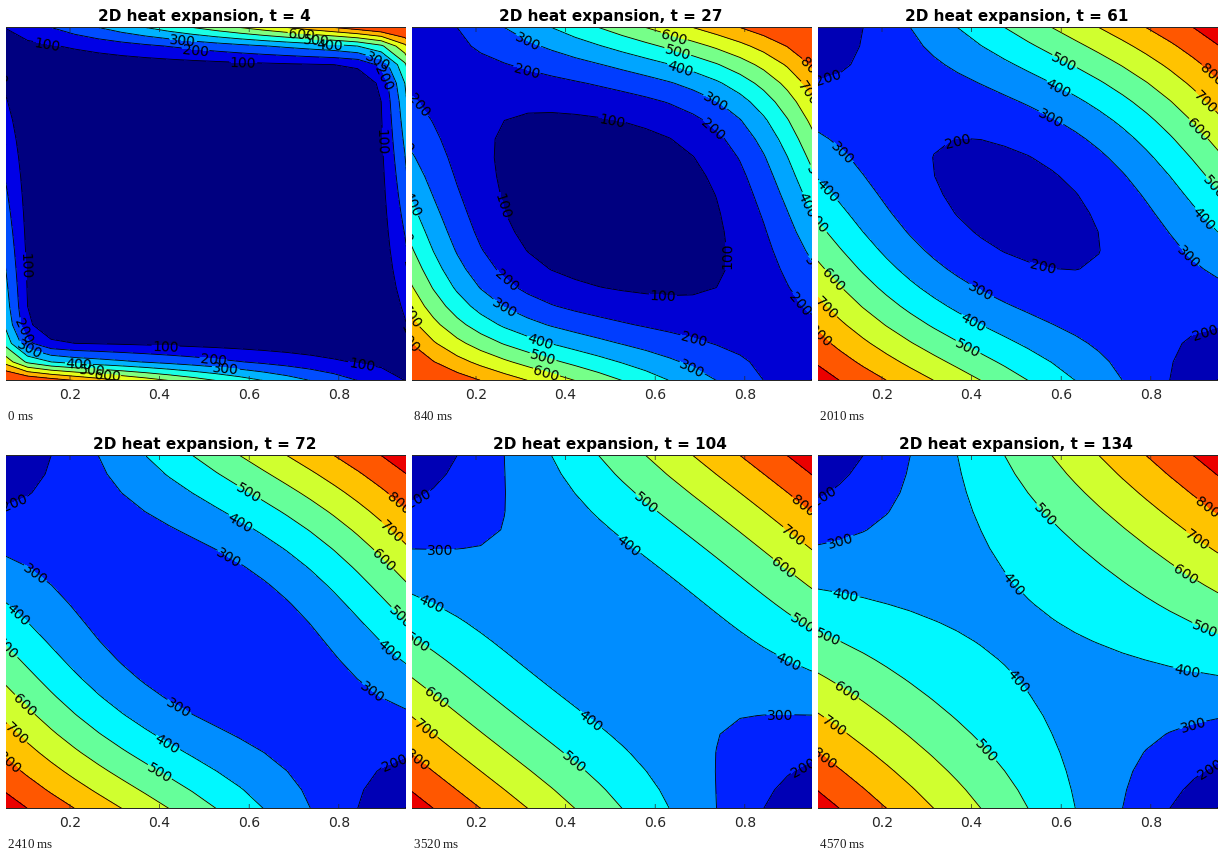
Write a matplotlib script that moves like this. It is 400 by 400 pixels and loops after 4.64 s.

```python
import numpy as np
import matplotlib.pyplot as plt
from matplotlib.animation import FuncAnimation
from matplotlib.collections import LineCollection

SIZE, DPI = 400, 100
PX = 72 / DPI                       # points per pixel
LOOP, TICK = 4640, 20               # ms
LEFT, WIDTH = -25.6, 448.0          # plot box, wider than the stage
TOP, HEIGHT = 21.5, 353.0
N = 20                              # grid nodes per side
COLD, HOT = 50, 1000
SPACING, GAP = 197.5, 14            # label distance and half gap along a line
INK = "#262626"

plt.rcParams["font.family"] = "DejaVu Sans"


def heat_history(steps):
    """Plate starting at 0 with linear edge temperatures, 4-neighbour mean."""
    x, v = np.meshgrid(np.linspace(0, 1, N), np.linspace(0, 1, N))
    u = COLD + (HOT - COLD) * (x + v - 2 * x * v)
    u[1:-1, 1:-1] = 0
    history = [u]
    for _ in range(steps):
        new = u.copy()
        new[1:-1, 1:-1] = (u[:-2, 1:-1] + u[2:, 1:-1]
                           + u[1:-1, :-2] + u[1:-1, 2:]) / 4
        history.append(new)
        u = new
    return history


def jet(f):
    return tuple(np.clip(1.5 - np.abs(4 * f - np.array([3, 2, 1])), 0, 1))


def oriented(p):
    """Run open lines from the side edge, closed ones counter-clockwise."""
    if np.allclose(p[0], p[-1]):
        p = p[:-1]
        x, y = p.T
        if np.sum(x * np.roll(y, -1) - np.roll(x, -1) * y) > 0:
            p = p[::-1]
        # begin at the rightmost crossing of the lowest grid row
        row = (p[:, 1] - TOP) / HEIGHT * (N - 1)
        on_row = np.abs(row - np.round(row)) < 1e-6
        rank = np.where(on_row, 1000 * np.round(row) + p[:, 0], -np.inf)
        p = np.roll(p, -np.argmax(rank), axis=0)
        return np.vstack([p, p[:1]])
    on_side = min(abs(p[0, 0] - LEFT), abs(p[0, 0] - LEFT - WIDTH)) < 1
    return p if on_side else p[::-1]


def place_labels(p):
    """Return line pieces with gaps, and (x, y, angle) of each label."""
    s = np.r_[0, np.cumsum(np.hypot(*np.diff(p, axis=0).T))]
    length = s[-1]

    def at(d):
        return np.column_stack([np.interp(d, s, p[:, 0]),
                                np.interp(d, s, p[:, 1])])

    count = 1 + int((length - 54) // SPACING) if length > 70 else 0
    first = 17 + 0.19 * (length - SPACING * (count - 1))
    pieces, labels, begin = [], [], 0
    for k in range(count):
        mid = first + k * SPACING
        a, c, b = at([mid - GAP, mid, mid + GAP])
        dx, dy = b - a
        if np.hypot(dx, dy) < 0.92 * 2 * GAP:       # bend too sharp
            continue
        angle = (90 - np.degrees(np.arctan2(dy, dx))) % 180 - 90
        labels.append((*((a + b + 2 * c) / 4), angle))
        pieces.append((begin, mid - GAP))
        begin = mid + GAP
    pieces.append((begin, length))
    lines = [at(np.r_[a, s[(s > a) & (s < b)], b]) for a, b in pieces if b > a]
    return lines, labels


# Moments at which the picture changes, in runs of nine.
RUNS = (130, 720, 1300, 1890, 2480, 3070, 3660, 4250)
starts = [0] + [r + 10 * int(6.49 * j) for r in RUNS for j in range(9)]
starts = np.array([s for s in starts if s < 4600])

history = heat_history(140)
gx, gy = np.meshgrid(np.linspace(LEFT, LEFT + WIDTH, N),
                     np.linspace(TOP, TOP + HEIGHT, N))

fig = plt.figure(figsize=(SIZE / DPI, SIZE / DPI), dpi=DPI, facecolor="white")
ax = fig.add_axes([0, 0, 1, 1])
ax.set_xlim(0, SIZE)
ax.set_ylim(SIZE, 0)
ax.axis("off")

title = ax.text(LEFT + WIDTH / 2, 15, "", ha="center", va="baseline",
                fontsize=15.2 * PX, fontweight="bold", color="black")
bottom = TOP + HEIGHT
ax.hlines([TOP, bottom], 0, SIZE, color=INK, lw=PX, zorder=5, snap=False)
for f in (0.2, 0.4, 0.6, 0.8):
    x = LEFT + WIDTH * f
    ax.vlines([x, x], [TOP, bottom - 4.5], [TOP + 4.5, bottom],
              color=INK, lw=0.7 * PX, zorder=5, snap=False)
    ax.text(x, 393.3, f"{f:.1f}", ha="center", va="baseline",
            fontsize=14 * PX, color=INK)

shown = {"t": None, "parts": []}


def draw_plate(t):
    u = history[t - 1]
    low = u.min()
    # the top level only appears once the plate is warmer than its cold corners
    levels = np.arange(100, 900 if low < COLD else 1000, 100)
    colors = [jet(0)] + [jet(max(0, (lv - low) / (HOT - low))) for lv in levels]
    fill = ax.contourf(gx, gy, u, levels=[-1, *levels, HOT + 1],
                       colors=colors, zorder=1)
    trace = ax.contour(gx, gy, u, levels=levels)
    segments = trace.allsegs
    trace.remove()

    lines, parts = [], [fill]
    for level, paths in zip(levels, segments):
        for path in paths:
            if len(path) < 2:
                continue
            pieces, labels = place_labels(oriented(np.asarray(path)))
            lines += pieces
            for x, y, angle in labels:
                if -20 < x < SIZE + 20:
                    parts.append(ax.text(
                        x, y, str(level), rotation=angle,
                        rotation_mode="anchor", ha="center",
                        va="center_baseline", fontsize=14 * PX,
                        color="black", zorder=4))
    strokes = LineCollection(lines, colors="black", linewidths=0.85 * PX,
                             zorder=3)
    parts.append(ax.add_collection(strokes, autolim=False))
    return parts


def update(i):
    now = i * TICK + TICK / 2
    start = starts[np.searchsorted(starts, now, side="right") - 1]
    t = 4 + int(start / 35.07)
    if t != shown["t"]:
        for part in shown["parts"]:
            part.remove()
        shown.update(t=t, parts=draw_plate(t))
        title.set_text(f"2D heat expansion, t = {t}")
    return [title, *shown["parts"]]


anim = FuncAnimation(fig, update, frames=LOOP // TICK, interval=TICK,
                     repeat=True, repeat_delay=0, blit=False)
plt.show()
```
